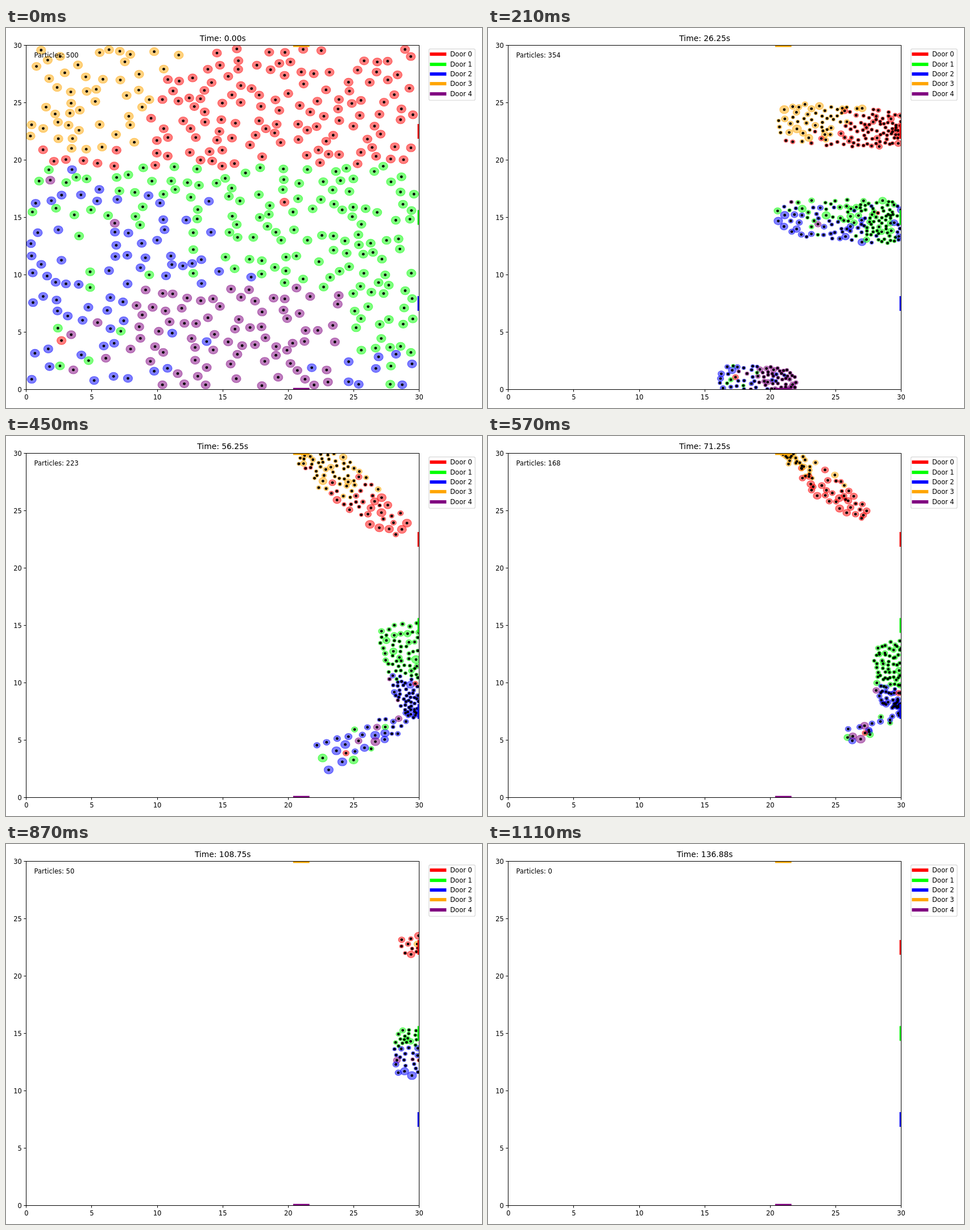
Recreate the animation shown at these times as an HTML page with a canvas. Size 837 by 669 pixels, loop 1140 ms.

```html
<!DOCTYPE html>
<html lang="en">
<head>
<meta charset="utf-8">
<title>Room evacuation</title>
<style>
  html, body { margin: 0; width: 100%; height: 100%; overflow: hidden; background: #fff; }
  canvas, svg { position: absolute; left: 0; top: 0; width: 837px; height: 669px; }
  text { font: 11.5px "DejaVu Sans", Verdana, sans-serif; fill: #000; white-space: pre; }
  #clock { font-size: 13.85px; }
</style>
</head>
<body>
<canvas id="room"></canvas>
<svg id="chart" viewBox="0 0 837 669">
  <g id="doors"></g>
  <rect x="35.5" y="30.5" width="691" height="606" fill="none" stroke="#000"/>
  <g id="ticks"></g>
  <rect x="743.7" y="36.8" width="81.2" height="90.4" rx="2.3" fill="#fff" stroke="#ccc" stroke-opacity=".8" stroke-width="1.15"/>
  <g id="legend"></g>
  <text id="clock" x="381.2" y="23" text-anchor="middle"></text>
  <text id="total" x="49.6" y="52"></text>
</svg>
<script>
const COLORS = ['#ff0000', '#00ff00', '#0000ff', '#ffa500', '#800080'];
const DOORS = [[30, 22.5], [30, 15], [30, 7.5], [21, 30], [21, 0]];
const SX = 23.023, SY = 20.2, FRAME = 30, LAST = 37;
const X = x => 35.8 + x * SX, Y = y => 636.5 - y * SY;
const $ = id => document.getElementById(id);

// ---- static chart ----
function add(parent, tag, attrs, text) {
  const el = document.createElementNS('http://www.w3.org/2000/svg', tag);
  for (const a in attrs) el.setAttribute(a, attrs[a]);
  if (text !== undefined) el.textContent = text;
  $(parent).append(el);
}
function box(parent, x, y, width, height, fill) {
  add(parent, 'rect', { x, y, width, height, fill });
}
for (let v = 0; v <= 30; v += 5) {
  const x = Math.floor(X(v)) + .5, y = Math.floor(Y(v)) + .5;
  add('ticks', 'path', { d: `M${x} 636.5v4.1M35.5 ${y}h-4.1`, stroke: '#000' });
  add('ticks', 'text', { x: X(v), y: 654, 'text-anchor': 'middle' }, v);
  add('ticks', 'text', { x: 27.8, y: y + 4.5, 'text-anchor': 'end' }, v);
}
DOORS.forEach(([x, y], i) => {
  const row = Math.round(46.1 + i * 17.45);
  if (x === 30) box('doors', 723.6, Y(y) - 13, 2.9, 26, COLORS[i]);
  else box('doors', X(x) - 14.4, y ? 30.5 : 633.6, 28.8, 2.9, COLORS[i]);
  box('legend', 745.4, row - 2.9, 28.9, 5.8, COLORS[i]);
  add('legend', 'text', { x: 781, y: row + 4 }, 'Door ' + i);
});

// ---- crowds ----
// heads: people at each key. home, detour: doors they queue for.
// bands: outline at each key after the first, from (x, y, half width) to the same.
const KEYS = [0, 3, 7, 15, 23, 29, LAST];
const CROWDS = [
  {
    home: 0, detour: 3, heads: [182, 160, 134, 85, 35, 11, 0],
    bands: [
      [10.8, 23.8, 3, 31, 22.8, 1],
      [20.6, 23.2, 2, 31, 22.6, 1.5],
      [21.3, 30.2, 1.9, 28.9, 23.1, 1.2],
      [21.6, 29, 1.8, 29.2, 23, .6],
      [28.6, 22.7, .9, 31, 22.7, .9]]
  },
  {
    home: 1, detour: 2, heads: [204, 185, 145, 105, 74, 39, 0],
    bands: [
      [11.3, 15, 3.4, 31, 13.4, 2.4],
      [20.4, 15, 1.6, 31, 14.5, 2],
      [29.5, 15.3, 3.2, 29.9, 6.9, 1.2],
      [30.2, 15.3, .8, 29.2, 7.1, 2.5],
      [28.1, 13.3, 2, 31, 13.3, 2]]
  },
  {
    home: 4, detour: 2, heads: [114, 99, 75, 33, 3, 0, 0],
    bands: [
      [10, 2.4, 2.6, 22, .4, 1],
      [16.1, .6, 1.7, 22, .3, 1.5],
      [22, 3.1, 1.5, 29, 6.8, .9],
      [24.8, 3, .7, 26.6, 6.6, .7]]
  }
];
const doorAt = (crowd, k) => k === 3 ? crowd.detour : crowd.home;

let seed = 20417;
function rnd() {
  seed = (seed + 0x6D2B79F5) | 0;
  let t = Math.imul(seed ^ (seed >>> 15), 1 | seed);
  t = (t + Math.imul(t ^ (t >>> 7), 61 | t)) ^ t;
  return ((t ^ (t >>> 14)) >>> 0) / 4294967296;
}
const mix = (a, b, u) => a + (b - a) * u;
const clamp = (v, lo, hi) => Math.min(hi, Math.max(lo, v));
const gap = (a, b) => Math.hypot(a.x - b.x, a.y - b.y);
const toDoor = (p, d) => Math.hypot(p.x - DOORS[d][0], p.y - DOORS[d][1]);

// Random point in a tapered band with rounded ends.
function inBand([x0, y0, w0, x1, y1, w1]) {
  const u = rnd(), len = Math.hypot(x1 - x0, y1 - y0);
  const off = (rnd() * 2 - 1) * mix(w0, w1, u) * Math.sqrt(1 - Math.abs(2 * u - 1) ** 6);
  return { x: mix(x0, x1, u) - (y1 - y0) / len * off, y: mix(y0, y1, u) + (x1 - x0) / len * off };
}

// Spread n spots over a band; space() sets the local distance.
function scatter(band, n, space) {
  const spots = [];
  let scale = 1.4;
  while (spots.length < n) {
    const p = inBand(band);
    if (p.x > 30 || p.y > 30 || p.y < 0) continue;
    const min = scale * space(p);
    if (spots.every(q => gap(p, q) > min)) spots.push(p);
    else scale *= .9985;
  }
  // Crowded spots get small circles.
  for (const p of spots) {
    let near = 2;
    for (const q of spots) if (q !== p) near = Math.min(near, gap(p, q));
    p.r = clamp((near - .4) * .4 + .09 + rnd() ** 2 * .22, .14, .35);
  }
  return spots;
}

function pickHue({ x, y }, crowd) {
  const n = rnd();
  if (crowd === 0) {
    if (x < 2 && y < 20.4) return 1;
    return y > 20.9 && x + n * 1.6 < 10 + (y > 27.4 ? 3.5 : 0) ? 3 : 0;
  }
  if (crowd === 2) {
    if (x > 8) return n < .94 ? 4 : 2;
    return n < .66 ? 2 : n < .8 ? 1 : n < .95 ? 4 : 0;
  }
  if (x > 24) return y < 3.5 && n < .6 ? 2 : 1;
  if (x > 15) return n < .015 ? 0 : n < (y < 10 ? .4 : .06) ? 2 : 1;
  if (y < 9.2 && x > 4) return n < .35 ? 4 : 2;
  if (y < 14) return n < .72 ? 2 : n < .96 ? 1 : 4;
  return n < .6 ? 1 : n < .97 ? 2 : 4;
}

// Order in strips along one axis, each strip sorted across it.
function strips(list, along, across) {
  const w = Math.ceil(Math.sqrt(list.length)), sorted = [...list].sort((a, b) => along(a) - along(b));
  const out = [];
  for (let i = 0; i < sorted.length; i += w)
    out.push(...sorted.slice(i, i + w).sort((a, b) => across(a) - across(b)));
  return out;
}

// ---- starting room ----
const people = [];
while (people.length < 500) {
  const p = { x: mix(.3, 29.7, rnd()), y: mix(.3, 29.7, rnd()), r: .35 };
  if (people.every(q => gap(p, q) > .74)) people.push({ x: p.x, y: p.y, path: [p] });
}
const [high, , bottom] = CROWDS.map(c => c.heads[0]);
const byHeight = [...people].sort((a, b) => b.y - a.y);
const low = p => p.y + (p.x > 24.5 ? 30 : 0);
const rest = byHeight.slice(high).sort((a, b) => low(a) - low(b));
[byHeight.slice(0, high), rest.slice(bottom), rest.slice(0, bottom)].forEach((list, g) => {
  CROWDS[g].list = list;
  for (const p of list) { p.crowd = CROWDS[g]; p.hue = pickHue(p, g); }
});
CROWDS[2].list.filter(p => p.hue === 4).sort((a, b) => a.x - b.x)
  .slice(0, 3).forEach(p => { p.late = true; });

// ---- plan each stretch between keys ----
for (let k = 0; k < 6; k++) {
  const leaving = [], ending = k === 5;
  CROWDS.forEach((c, g) => {
    const n = c.heads[k + 1], door = doorAt(c, k);
    for (const p of c.list)
      p.wait = toDoor(p.path[k], door) - (p.hue === door ? 1.2 : 0) + (p.late ? 99 : 0);
    c.list.sort((a, b) => a.wait - b.wait);
    const out = c.list.slice(0, c.list.length - n);
    out.forEach((p, i) => {
      const turn = (i + .5) / out.length;
      p.door = ending && turn > .8 ? 0 : door;
      leaving.push({ p, turn });
    });
    c.list = c.list.slice(out.length);
    if (!n) return;
    const wall = doorAt(c, k + 1);
    const spots = scatter(c.bands[k], n, p => .3 + Math.min(1, toDoor(p, wall) / 11) * .6);
    // The middle crowd turns into a column along the wall.
    const column = g === 1 && k >= 2;
    const now = p => column ? p.path[k].y + p.path[k].x * .2 + (p.hue === 1 ? 3 : 0) : p.path[k].x;
    const from = strips(c.list, now, p => column ? p.path[k].x : p.path[k].y);
    const to = strips(spots, s => column ? s.y : s.x, s => column ? s.x : s.y);
    from.forEach((p, i) => p.path.push(to[i]));
  });
  leaving.sort((a, b) => a.turn - b.turn);
  leaving.forEach(({ p }, i) => {
    const q = (i + 1) / leaving.length, u = ending ? 1 - (1 - q) ** .667 : q;
    const [x, y] = DOORS[p.door], j = rnd() - .5, side = x === 30;
    p.out = { k, at: mix(KEYS[k], KEYS[k + 1], u), x: side ? x : x + j, y: side ? y + j : y };
  });
}

// Place of one person at a frame, or null once outside.
function place(p, f, k) {
  if (p.out.k < k || f >= p.out.at) return null;
  const a = p.path[k], start = KEYS[k];
  if (p.out.k === k) {
    const v = ((f - start) / (p.out.at - start)) ** 1.2;
    return { x: mix(a.x, p.out.x, v), y: mix(a.y, p.out.y, v), r: mix(a.r, .2, v) };
  }
  // Queues hold near their door first, then move on.
  const b = p.path[k + 1], u = (f - start) / (KEYS[k + 1] - start);
  const queue = k === 2 || k === 3, e = queue ? u * u : u;
  const pull = queue ? .2 * Math.sin(Math.PI * u) : 0;
  const [dx, dy] = DOORS[doorAt(p.crowd, k)];
  return {
    x: mix(a.x, b.x, e) + (dx - a.x) * pull,
    y: mix(a.y, b.y, e) + (dy - a.y) * pull,
    r: mix(a.r, b.r, u)
  };
}

// ---- drawing ----
const ctx = $('room').getContext('2d'), ratio = window.devicePixelRatio || 1;
$('room').width = 837 * ratio;
$('room').height = 669 * ratio;
ctx.scale(ratio, ratio);
ctx.beginPath();
ctx.rect(35.8, 30.5, 690.7, 606);
ctx.clip();
ctx.lineWidth = 1.15;

function draw(f) {
  let k = 5;
  while (KEYS[k] > f) k--;
  ctx.clearRect(0, 0, 837, 669);
  const spots = [];
  ctx.globalAlpha = .5;
  for (const p of people) {
    const s = place(p, f, k);
    if (!s) continue;
    spots.push(s);
    ctx.fillStyle = ctx.strokeStyle = COLORS[p.hue];
    ctx.beginPath();
    ctx.ellipse(X(s.x), Y(s.y), s.r * SX, s.r * SY, 0, 0, 7);
    ctx.fill();
    ctx.stroke();
  }
  ctx.globalAlpha = 1;
  ctx.fillStyle = '#000';
  for (const s of spots) {
    ctx.beginPath();
    ctx.arc(X(s.x), Y(s.y), 2.4, 0, 7);
    ctx.fill();
  }
  const time = Math.min(f * 3.75, 136.875);
  $('clock').textContent = `Time: ${(time + 1e-6).toFixed(2)}s`;
  $('total').textContent = 'Particles: ' + spots.length;
}

let shown = -1;
function tick(now) {
  const f = Math.floor(now / FRAME) % (LAST + 1);
  if (f !== shown) draw(shown = f);
  requestAnimationFrame(tick);
}
draw(0);
requestAnimationFrame(tick);
</script>
</body>
</html>
```
